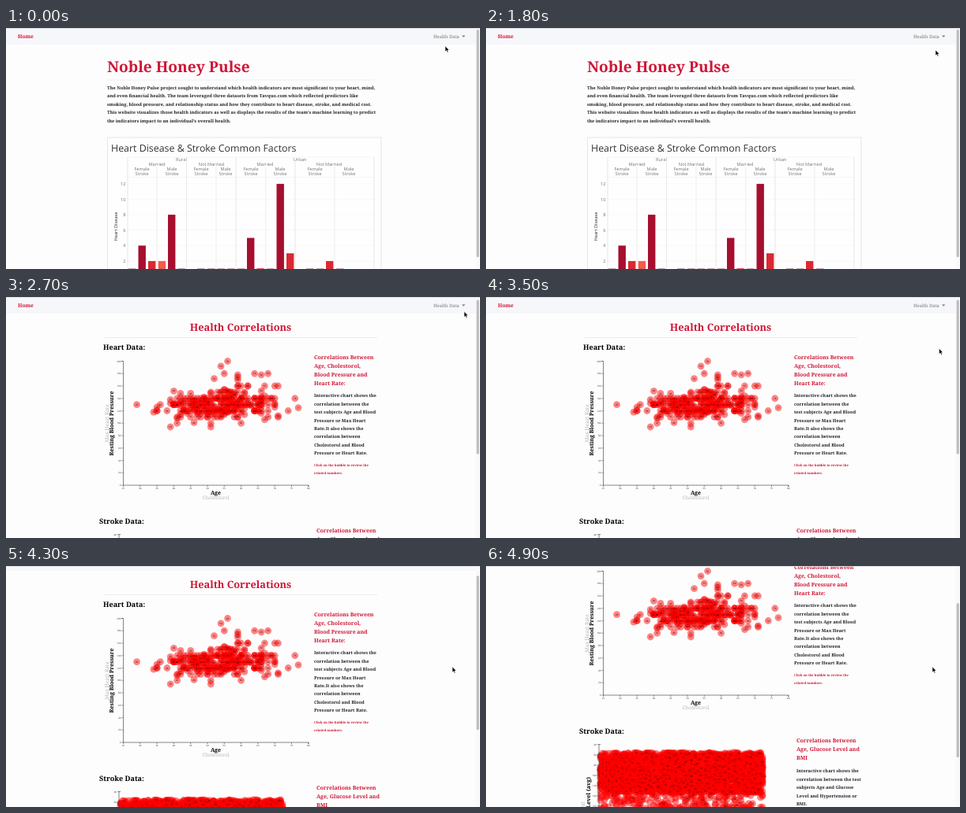
These frames come from a looping animation (600x306 px, 5 s). An HTML page:

```html
<!DOCTYPE html>
<html lang="en">
<head>
<meta charset="utf-8">
<title>Health Data</title>
<style>
html, body { margin: 0; width: 100%; height: 100%; overflow: hidden; background: #fefdfe; }
svg { display: block; width: 100vw; height: 100vh; }
text { font-family: "Noto Serif", Georgia, serif; text-rendering: geometricPrecision; white-space: pre; }
.b { font-weight: 700; }
.s { font-family: "Open Sans", "Noto Sans", sans-serif; }
</style>
</head>
<body>
<svg id="stage" viewBox="0 0 600 306"></svg>
<script>
const RED = '#cf1735', INK = '#25252a', GRAY = '#777', PALE = '#b9b9b9';
const DARK = '#a60f2e', MID = '#dc2833', LIGHT = '#f3594c';
const LOOP = 5000, STEP = 100;

function el(parent, tag, attrs = {}, content) {
  const node = document.createElementNS('http://www.w3.org/2000/svg', tag);
  for (const k in attrs) node.setAttribute(k, attrs[k]);
  if (content !== undefined) node.textContent = content;
  return parent.appendChild(node);
}
const text = (p, x, y, size, str, fill, cls = 'b', anchor = 'start', extra = {}) =>
  el(p, 'text', { x, y, 'font-size': size, fill, class: cls, 'text-anchor': anchor, ...extra }, str);
const lines = (p, x, y, gap, size, list, fill) =>
  list.forEach((s, i) => text(p, x, y + i * gap, size, s, fill));
const upright = (p, x, y, size, str, fill, cls, anchor = 'middle') =>
  text(p, 0, 0, size, str, fill, cls, anchor, { transform: `translate(${x} ${y}) rotate(-90)` });
const rect = (p, x, y, width, height, fill, extra = {}) =>
  el(p, 'rect', { x, y, width, height, fill, ...extra });
const line = (p, d, stroke, w = 0.6) =>
  el(p, 'path', { d, stroke, 'stroke-width': w, fill: 'none' });

let seed = 11;
function rnd() {
  seed = (seed + 0x6D2B79F5) | 0;
  let t = Math.imul(seed ^ (seed >>> 15), 1 | seed);
  t = (t + Math.imul(t ^ (t >>> 7), 61 | t)) ^ t;
  return ((t ^ (t >>> 14)) >>> 0) / 4294967296;
}
const bell = () => (rnd() + rnd() + rnd() + rnd() - 2) * 1.73;

const stage = document.getElementById('stage');
const doc = el(stage, 'g');
const home = el(doc, 'g'), corr = el(doc, 'g');

function buildHome(g) {
  text(g, 128, 56, 19.1, 'Noble Honey Pulse', RED);
  line(g, 'M128 66H467', '#e4e2e4');
  lines(g, 128, 78, 10.4, 5.7, [
    'The Noble Honey Pulse project sought to understand which health indicators are most significant to your heart, mind,',
    'and even financial health. The team leveraged three datasets from Tavquo.com which reflected predictors like',
    'smoking, blood pressure, and relationship status and how they contribute to heart disease, stroke, and medical cost.',
    'This website visualizes those health indicators as well as displays the results of the team’s machine learning to predict',
    'the indicators impact to an individual’s overall health.'], INK);

  rect(g, 128.5, 139, 346.5, 200, '#fffeff', { stroke: '#e0dfe0', 'stroke-width': 0.8 });
  text(g, 133, 157, 12.4, 'Heart Disease & Stroke Common Factors', '#333', 's');
  const label = (x, y, s) => text(g, x, y, 5.7, s, GRAY, 's', 'middle');
  label(222, 169, 'Rural');
  label(372, 169, 'Urban');
  [191, 260, 328, 409].forEach((x, i) => label(x, 175, i % 2 ? 'Not Married' : 'Married'));
  [172, 210, 247, 278, 310, 347, 391, 434].forEach((x, i) => {
    label(x, 181, i % 2 ? 'Male' : 'Female');
    label(x, 187, 'Stroke');
  });

  const yOf = v => 315.5 - v * 9.8;
  for (let v = 2; v <= 12; v += 2) {
    line(g, `M154 ${yOf(v)}H466`, '#f1f0f1', 0.5);
    text(g, 151.5, yOf(v) + 2, 5.7, v, GRAY, 's', 'end');
  }
  line(g, 'M154 164H466M154 189.5H466', '#e9e8e9', 0.5);
  [191, 266, 329, 416].forEach(x => line(g, `M${x} 176V306`, '#e3e2e3'));
  [228.5, 366].forEach(x => line(g, `M${x} 170V306`, '#d9d8d9'));
  [154, 291, 466].forEach(x => line(g, `M${x} 164V306`, '#d9d8d9'));
  upright(g, 141, 252, 5.7, 'Heart Disease', '#333', 's');

  const bar = (x, v, fill) => rect(g, x, yOf(v), 9.4, v * 9.8, fill);
  [155, 217.5, 242, 255, 267.5, 280, 293, 330, 380, 393, 418].forEach(x => bar(x, 1.03, '#8d6068'));
  bar(167.5, 4, DARK);  bar(180, 2, MID);
  bar(192.7, 2, LIGHT); bar(205, 8, DARK);
  bar(305, 5, DARK);    bar(317.5, 1.05, MID);
  bar(342.5, 12, DARK); bar(355, 3, MID);
  bar(405, 2, MID);
}

function bubble(g, x, y, num) {
  el(g, 'circle', { cx: x, cy: y, r: 4.4, fill: '#f00', 'fill-opacity': 0.48 });
  if (num !== undefined) text(g, x, y + 1.1, 3.1, num, '#200', 's', 'middle');
}

function buildHeartChart(g) {
  const xOf = a => 148.5 + (a - 25) * 4.26, yOf = b => 239 - b * 0.7875;
  const outliers = [[29, 130], [76, 140], [77, 125], [56, 200], [54, 192], [55, 180], [59, 178], [59, 174],
    [64, 180], [66, 178], [68, 180], [52, 172], [59, 170], [39, 94], [51, 94], [51, 100], [67, 106],
    [71, 112], [71, 110], [70, 160], [71, 160], [34, 118], [35, 120], [35, 126], [74, 120], [40, 152],
    [41, 100], [46, 101], [60, 100]];
  outliers.forEach(([a, b]) => bubble(g, xOf(a), yOf(b), a));
  let left = 275;
  while (left) {
    const a = Math.round(54.5 + 9 * bell());
    const b = 130 + 0.5 * (a - 54) + 13.5 * bell();
    if (a < 35 || a > 70 || b < 105 || b > 146 + (a - 38) * 0.7) continue;
    const grid = rnd() < 0.55 ? 10 : 2;
    bubble(g, xOf(a), yOf(Math.round(b / grid) * grid), a);
    left--;
  }
  line(g, 'M146 81.5H148.5V239H383V241', '#333', 0.6);
  for (let v = 0; v <= 200; v += 20) {
    line(g, `M146.5 ${yOf(v)}h2`, '#333', 0.5);
    text(g, 145.5, yOf(v) + 1, 3, v, '#333', 's', 'end');
  }
  for (let a = 25; a <= 80; a += 5) {
    line(g, `M${xOf(a)} 239v2`, '#333', 0.5);
    text(g, xOf(a), 244, 3, a, '#333', 's', 'middle');
  }
  upright(g, 136.3, 160.5, 7.05, 'Resting Blood Pressure', '#000', 'b');
  upright(g, 129.8, 160.5, 6.5, 'Max Heart Rate', PALE, '');
  text(g, 265.5, 251, 7.1, 'Age', '#000', 'b', 'middle');
  text(g, 265.5, 257.3, 6.3, 'Cholestorol', PALE, '', 'middle');
}

function buildStrokeChart(g) {
  const yOf = v => 301.5 + (v - 40) * 0.65;
  const count = 2600, numbered = 600;
  for (let i = 0; i < count; i++) {
    const age = Math.floor(rnd() * 83);
    const sugar = i % 12 ? 56 + 78 * rnd() : 130 + 38 * rnd();
    bubble(g, 145 + age * 2.5, yOf(sugar), i < count - numbered ? undefined : age);
  }
  line(g, 'M145 301.5H143V400', '#333', 0.6);
  for (let v = 40; v <= 180; v += 20) {
    line(g, `M141 ${yOf(v)}h2`, '#333', 0.5);
    text(g, 140, yOf(v) + 1, 3, v, '#333', 's', 'end');
  }
  upright(g, 131.5, 343, 7.05, 'Glucose Level (avg)', '#000', 'b', 'end');
  upright(g, 125, 374, 6.3, 'BMI', PALE, '', 'end');
}

function buildCorr(g) {
  text(g, 297, 43, 12.8, 'Health Correlations', RED, 'b', 'middle');
  line(g, 'M123 51.5H470', '#e4e2e4');
  text(g, 123, 67.3, 9.1, 'Heart Data:', '#000');
  buildHeartChart(g);
  lines(g, 390, 79.3, 10.9, 6.9,
    ['Correlations Between', 'Age, Cholestorol,', 'Blood Pressure and', 'Heart Rate:'], RED);
  lines(g, 390, 127.2, 10.45, 5.7, ['Interactive chart shows the', 'correlation between the',
    'test subjects Age and Blood', 'Pressure or Max Heart', 'Rate.It also shows the',
    'correlation between', 'Cholestorol and Blood', 'Pressure or Heart Rate.'], INK);
  lines(g, 390, 214.7, 10.6, 4.13, ['Click on the bubble to review the', 'related numbers.'], RED);

  text(g, 118, 288.2, 9.1, 'Stroke Data:', '#000');
  buildStrokeChart(g);
  lines(g, 393, 299.3, 10.9, 6.9, ['Correlations Between', 'Age, Glucose Level and', 'BMI'], RED);
  lines(g, 393, 337.3, 10.45, 5.7, ['Interactive chart shows the', 'correlation between the test',
    'subjects Age and Glucose', 'Level and Hypertension or', 'BMI.'], INK);
}

buildHome(home);
buildCorr(corr);

// Navigation bar and its dropdown
rect(doc, 0, 0, 600, 21, '#f6f7fa');
text(doc, 15, 13, 6.6, 'Home', RED);
const toggle = rect(doc, 539, 3, 44, 15.5, '#c9c9cb');
const toggleText = text(doc, 541, 12.8, 5.8, 'Health Data', GRAY, '');
const caret = el(doc, 'path', { d: 'M577 9.6h4.4l-2.2 2.2z' });
const menu = el(doc, 'g');
rect(menu, 538.5, 19, 54.5, 45, '#fff', { stroke: '#d5d5d8', 'stroke-width': 0.6, rx: 1 });
const hover = rect(menu, 539, 23, 53.5, 12, '#f5f6f8');
lines(menu, 546, 30.4, 12.9, 4.5, ['Health Correlations', 'Lifestyle & Health', 'Stroke Predictor'], RED);

// Browser frame
rect(stage, 594.5, 0, 5.5, 306, '#f9f8fa');
const thumb = rect(stage, 595.6, 2, 3.2, 289, '#bdbcbf', { rx: 1.6 });
rect(stage, 0, 0, 600, 0.9, '#d9dade');

const arrow = el(stage, 'path', { d: 'M0 0V7L1.6 5.6L2.7 8.1L3.9 7.6L2.8 5.1H4.9Z',
  fill: '#000', stroke: '#fff', 'stroke-width': 0.5 });
const hand = el(stage, 'path', {
  d: 'M-.7 .3Q0-.5 .7 .3V3L3.4 3.5Q4.2 3.8 4 5L3.4 7.8H-.8L-2.8 4.9Q-2.6 3.9-1.6 4.4L-.7 5.1Z',
  fill: '#fff', stroke: '#222', 'stroke-width': 0.6 });

// Keys: [time, ...values]
const pointer = [[0, 556, 23], [600, 568, 16], [800, 568, 16], [1200, 568, 27], [1400, 568, 27],
  [1500, 569, 28], [2000, 569, 28], [2600, 580, 18.5], [3200, 580, 18.5], [3900, 565, 128]];
const scroll = [[4000, 0], [4100, 6], [4500, 24], [4700, 42], [4900, 75]];

function at(keys, t) {
  const i = keys.findIndex(k => k[0] > t);
  if (i < 0) return keys[keys.length - 1].slice(1);
  if (i === 0) return keys[0].slice(1);
  const a = keys[i - 1], b = keys[i], u = (t - a[0]) / (b[0] - a[0]);
  return a.slice(1).map((v, j) => v + (b[j + 1] - v) * u);
}
const show = (node, on) => node.setAttribute('display', on ? 'inline' : 'none');

function draw(t) {
  const [x, y] = at(pointer, t), [top] = at(scroll, t);
  const second = t >= 1900, active = t >= 500 && t < 1500, open = t >= 800 && t < 1500;
  doc.setAttribute('transform', `translate(0 ${-top})`);
  show(home, !second);
  show(corr, second);
  show(toggle, active);
  toggleText.setAttribute('fill', active ? '#222' : GRAY);
  caret.setAttribute('fill', active ? '#222' : GRAY);
  show(menu, open);
  show(hover, y > 23);
  thumb.setAttribute('y', second ? 3.5 + top * 0.58 : 2);
  thumb.setAttribute('height', second ? 196 : 289);
  show(arrow, !active);
  show(hand, active);
  for (const c of [arrow, hand]) c.setAttribute('transform', `translate(${x} ${y})`);
}

const start = performance.now();
function tick() {
  const t = (performance.now() - start) % LOOP;
  draw(Math.floor(t / STEP) * STEP);
  requestAnimationFrame(tick);
}
tick();
</script>
</body>
</html>
```
